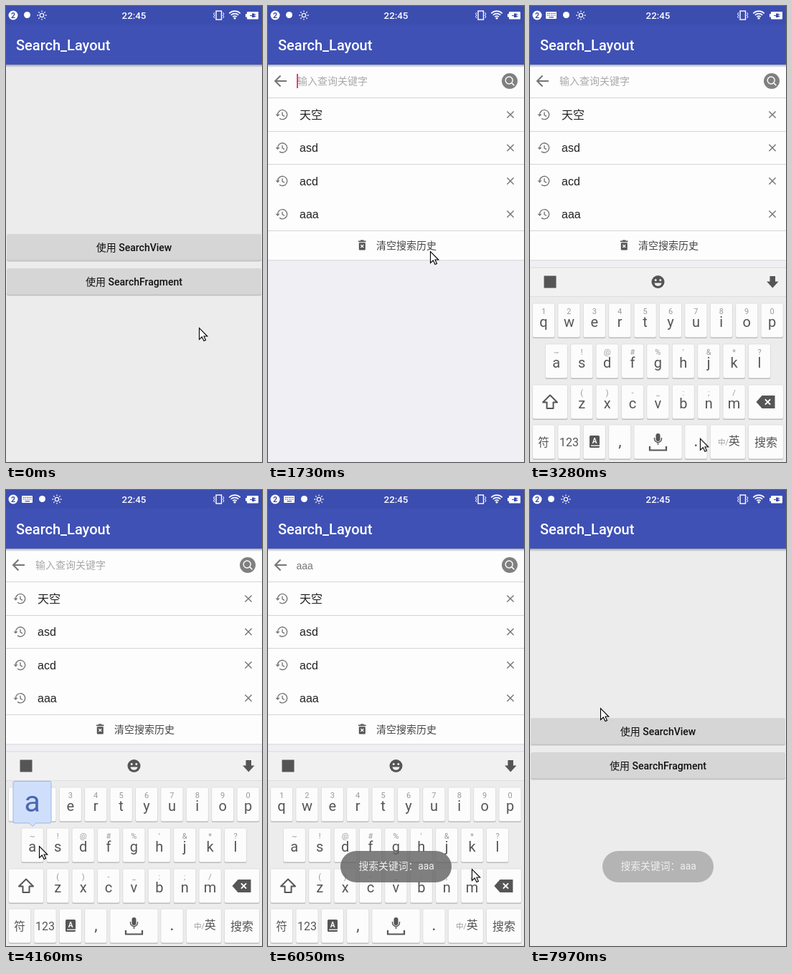
Animation of 357x638 px, one loop 8000 ms. Source, as an HTML page:

```html
<!DOCTYPE html>
<html lang="zh">
<head>
<meta charset="utf-8">
<title>Search_Layout</title>
<style>
html, body { margin: 0; width: 100%; height: 100%; overflow: hidden; background: #ececec; }
svg { display: block; width: 100vw; height: 100vh; }
text { font-family: Roboto, "Noto Sans CJK SC", "Noto Sans CJK", sans-serif; white-space: pre; }
.entry text { font-family: "Liberation Sans", "Noto Sans CJK SC", "Noto Sans CJK", sans-serif; }
.key { fill: #fcfcfc; stroke: #d6d6d6; stroke-width: .6; }
</style>
</head>
<body>
<svg id="stage" viewBox="0 0 357 638" preserveAspectRatio="none"></svg>
<script>
const LOOP = 8000;
const sheet = [];
let trackCount = 0;

// Turns [ms, css, easing] stops into a looping keyframe animation.
function track(stops, timing = 'linear') {
  const name = 'track' + trackCount++;
  const last = stops[stops.length - 1];
  const frames = [...stops, [LOOP, last[1]]]
    .map(([ms, css, ease]) => `${ms / LOOP * 100}%{${css}${ease ? `;animation-timing-function:${ease}` : ''}}`);
  sheet.push(`@keyframes ${name}{${frames.join('')}}.${name}{animation:${name} ${LOOP}ms ${timing} infinite}`);
  return name;
}

// Hard on/off switching; times alternate between on and off.
const visible = (...times) => track(
  [[0, 'opacity:0'], ...times.map((ms, i) => [ms, `opacity:${i % 2 ? 0 : 1}`])], 'step-end');

const move = (x, y) => `transform:translate(${x}px,${y}px)`;
const group = (cls, ...parts) => `<g class="${cls}">${parts.join('')}</g>`;
const at = (x, y, ...parts) => `<g transform="translate(${x} ${y})">${parts.join('')}</g>`;
const rect = (x, y, w, h, fill, extra = '') =>
  `<rect x="${x}" y="${y}" width="${w}" height="${h}" fill="${fill}" ${extra}/>`;
const circle = (x, y, r, fill, extra = '') => `<circle cx="${x}" cy="${y}" r="${r}" fill="${fill}" ${extra}/>`;
const fillPath = (d, fill, extra = '') => `<path d="${d}" fill="${fill}" ${extra}/>`;
const line = (d, color, width = 1.5, extra = '') =>
  `<path d="${d}" fill="none" stroke="${color}" stroke-width="${width}" ${extra}/>`;
const label = (x, y, size, fill, str, anchor = 'start', weight = 400) =>
  `<text x="${x}" y="${y}" font-size="${size}" fill="${fill}" text-anchor="${anchor}" font-weight="${weight}">${str}</text>`;
const centered = (x, y, size, fill, str, weight) => label(x, y, size, fill, str, 'middle', weight);

// Status bar and toolbar
const toolbar = () =>
  rect(0, 82, 357, 4, 'url(#shade)') + rect(0, 0, 357, 82, '#3f51b5') + rect(0, 0, 357, 26, '#3c4db0') +
  label(14, 62, 20, '#fff', 'Search_Layout', 'start', 500);

function sun() {
  let rays = '';
  for (let i = 0; i < 8; i++) {
    const c = Math.cos(i * Math.PI / 4), s = Math.sin(i * Math.PI / 4);
    rays += `M${c * 4.8} ${s * 4.8}L${c * 6.6} ${s * 6.6}`;
  }
  return circle(0, 0, 2.7, 'none', 'stroke="#fff" stroke-width="1.2"') + line(rays, '#fff', 1.3);
}

function statusIcons() {
  const shift = track([[0, move(0, 0)], [1800, move(21, 0)], [7700, move(0, 0)]], 'step-end');
  const wifi = [4, 7.5, 11].map(r => {
    const d = r * .7;
    return line(`M${-d} ${-d}A${r} ${r} 0 0 1 ${d} ${-d}`, '#fff', 1.7);
  }).join('');
  return circle(10, 13, 6.5, '#fff') + centered(10, 16.8, 10.5, '#3c4db0', '2', 700) +
    group(visible(1800, 7700),
      rect(22, 8, 15, 10, '#fff', 'rx="1"'),
      line('M24 10.5H35.5M24 13H35.5', '#3c4db0', 1.2, 'stroke-dasharray="1.5 1"'), line('M26.5 15.7H33', '#3c4db0', 1.2)) +
    group(shift, circle(29.5, 12.5, 4.5, '#fff'), at(50, 13, sun())) +
    centered(178.5, 18, 13.3, '#fff', '22:45', 500) +
    rect(293, 7, 7.5, 12, 'none', 'stroke="#fff" stroke-width="1.4"') +
    line('M291 9l-1.5 2l1.5 2l-1.5 2l1.5 2M302.5 9l1.5 2l-1.5 2l1.5 2l-1.5 2', '#fff', 1) +
    at(319, 18, wifi, circle(0, -1, 1.6, '#fff')) +
    rect(336, 8, 16, 10.5, '#fff', 'rx="1"') + rect(334, 11, 2, 4.5, '#fff') +
    fillPath('M340 13h3v-2.5h3.5v1h2v1h-2v1.5h2v1h-2v1h-3.5v-2h-3z', '#3c4db0');
}

// Home page
const button = y =>
  rect(1, y + 2, 355, 36.5, '#c3c3c3', 'rx="2.5"') + rect(1, y, 355, 36.5, '#d6d6d6', 'rx="2.5"');
const buttonText = (y, name) =>
  centered(178.5, y, 14, '#111', `<tspan font-weight="400">使用</tspan> ${name}`, 500);

function home() {
  const press = track([[0, 'opacity:0'], [890, 'opacity:0'], [960, 'opacity:1'], [1090, 'opacity:1'], [1190, 'opacity:0']]);
  return rect(0, 0, 357, 638, '#ececec') + toolbar() +
    button(319) + group(press, rect(0, 356, 357, 6, 'url(#shade)'), rect(1, 322, 355, 34, '#c6c6c6', 'rx="2"')) +
    buttonText(343, 'SearchView') + button(367) + buttonText(391, 'SearchFragment');
}

// Search page
const divider = y => rect(0, y, 357, 1, '#d4d4d4');
const cross = (x, y, r, color, w) => line(`M${x - r} ${y - r}l${2 * r} ${2 * r}m0 ${-2 * r}l${-2 * r} ${2 * r}`, color, w);
const trash = () => rect(126, 328.5, 10.5, 1.7, '#555') + rect(129, 327.4, 4.5, 1.5, '#555') +
  rect(126.8, 331.2, 9, 10.2, '#555', 'rx="1"') + cross(131.3, 336, 2, '#fff', 1.2);

function historyRow(word, y) {
  return at(0, y,
    line('M13.5 0A6.6 6.6 0 1 1 16 5.2M20 -3.5V.5L23 2.3', '#777', 1.4),
    fillPath('M10.5 -.5h6l-3 3.2z', '#777'),
    group('entry', label(44, 5.8, 16, '#222', word)), cross(338, 0, 4.6, '#757575', 1.4));
}

function historyList(words, clearable) {
  const rows = words.map((word, i) => historyRow(word, 152 + i * 46.4));
  const dividers = words.slice(1, 3).map((_, i) => divider(175 + i * 46));
  const end = clearable ? 355 : 128.5 + words.length * 46.4;
  return rect(0, end, 357, 1.5, '#e0e0e4') + rect(0, 129, 357, end - 129, '#fdfdfd') + rows.join('') + dividers.join('') +
    (clearable ? divider(314) + trash() + label(151, 340, 14, '#444', '清空搜索历史') : '');
}

function searchBar() {
  const caretBlink = visible(1430, 1860, 2330, 2830, 3310, 3810, 4220, 5250);
  const caretStep = track([[0, move(0, 0)], [4220, move(8, 0)], [4460, move(15, 0)], [4740, move(22, 0)]], 'step-end');
  const typed = (str, ...times) => group(visible(...times), group('entry', label(39.5, 110.5, 14, '#777', str)));
  return rect(0, 82, 357, 46.5, '#fdfdfd') + rect(0, 82, 357, 4, 'url(#shade)') + divider(128) +
    line('M26 105H10M17.5 97.5L10 105l7.5 7.5', '#757575', 2) +
    group(visible(1430, 4220), label(41, 110.2, 14, '#a9a9a9', '输入查询关键字')) +
    typed('a', 4220, 4460) + typed('aa', 4460, 4740) + typed('aaa', 4740) +
    group(caretBlink, group(caretStep, rect(40, 95, 2, 20, '#f0387c'))) +
    group(visible(4220, 5800), circle(306, 104.5, 8.7, '#666'), cross(306, 104.5, 3.2, '#fff', 2)) +
    circle(337, 105, 11, '#808080') +
    circle(336.2, 104, 5, 'none', 'stroke="#fff" stroke-width="1.4"') + line('M339.8 107.6l3.6 3.6', '#fff', 1.5);
}

function searchPage() {
  const slide = track([
    [0, 'opacity:0;' + move(0, 0)], [1429, 'opacity:0;' + move(0, 21)],
    [1430, 'opacity:.76;' + move(0, 21)], [1500, 'opacity:1;' + move(0, 8)], [1640, 'opacity:1;' + move(0, 0)],
    [7600, 'opacity:1;' + move(0, 0), 'ease-in'], [7680, 'opacity:1;' + move(0, 10)], [7860, 'opacity:0;' + move(0, 51)]]);
  return group(slide, rect(0, 0, 357, 638, '#efeff4'), toolbar(),
    group(visible(1430, 4220, 5800), historyList(['天空', 'asd', 'acd', 'aaa'], true)),
    group(visible(4220, 4460), historyList(['asd', 'acd', 'aaa'])),
    group(visible(4460, 5800), historyList(['aaa'])),
    searchBar());
}

// Keyboard
const INK = '#555';
const key = (x, y, w, h) => rect(x, y + 1.6, w, h, '#bdbdbd', 'rx="2.5"') +
  `<rect class="key" x="${x}" y="${y}" width="${w}" height="${h}" rx="2.5"/>`;
const hint = (x, y, str) => centered(x, y, 11, '#999', str);
const mic = (x, y) => at(x, y,
  rect(-3, -13, 6, 11, INK, 'rx="3"'), line('M-5 -7v1.5a5 5 0 0 0 10 0V-7M0 0V3', INK, 1.4),
  line('M-11.5 5V10.5H11.5V5', INK, 2.2));
const backspace = (x, y) => fillPath(`M${x - 13} ${y}l8 -9h18v18h-18z`, INK) + cross(x + 3, y, 3.6, '#fff', 2);

function keyboardTop() {
  return rect(0, 366, 357, 272, '#ececec') + rect(0, 366, 357, 40, '#f1f1f1') +
    rect(0, 365.5, 357, 1, '#dadada') + rect(0, 406, 357, 1, '#dedede') +
    rect(19.5, 377.5, 17, 17, INK) +
    circle(178.5, 386, 9, INK) + circle(175.2, 383.6, 1.5, '#f1f1f1') + circle(181.8, 383.6, 1.5, '#f1f1f1') +
    fillPath('M173.5 387.5h10a5 4.2 0 0 1 -10 0z', '#f1f1f1') +
    fillPath('M334.5 378h7.5v7.5h4.5l-8.2 9l-8.2 -9h4.4z', INK);
}

function phonePad() {
  const names = ['分词', 'ABC', 'DEF', 'GHI', 'JKL', 'MNO', 'PQRS', 'TUV', 'WXYZ'];
  const marks = [['，', 35, 434], ['。', 35, 480], ['?', 30, 522], ['!', 30, 562]];
  let out = key(3, 412, 54, 170);
  marks.forEach(([mark, x, y], i) => {
    out += centered(x, y, 19, INK, mark);
    if (i) out += rect(8, 412 + i * 41, 44, .7, '#e2e2e2');
  });
  names.forEach((name, i) => {
    const x = 61 + i % 3 * 80, y = 412 + Math.floor(i / 3) * 58.3;
    out += key(x, y, 76, 54) + hint(x + 38, y + 17, i + 1) + centered(x + 38, y + 35.8, 17, INK, name);
  });
  for (let i = 0; i < 3; i++) out += key(301, 412 + i * 58.3, 53, 54);
  out += backspace(327, 440.5) + centered(327.5, 503.5, 16, INK, '重输') + centered(327.5, 562, 18, INK, '0');
  [[3, 54], [61, 76], [141, 76], [221, 76], [301, 53]].forEach(([x, w]) => out += key(x, 587, w, 49));
  return out + centered(30, 618, 16, INK, '符') + centered(99, 618, 17, INK, '123') + mic(178.5, 613) +
    label(243, 617.5, 16, INK, '中<tspan font-size="11" fill="#999">/英</tspan>') + centered(327.5, 617.5, 16, INK, '搜索');
}

function letterPad() {
  const rows = [[3.5, 416, 'qwertyuiop', '1234567890'], [21.3, 473, 'asdfghjkl', "~!@#%'&amp;*?"], [56.7, 530, 'zxcvbnm', '()-_:;/']];
  let out = '';
  rows.forEach(([x0, y, letters, marks]) => {
    const signs = marks.match(/&amp;|./g);
    [...letters].forEach((letter, i) => {
      const x = x0 + i * 35.4;
      out += key(x, y, 31, 47.5) + hint(x + 15.5, y + 14.5, signs[i]) + centered(x + 15.5, y + 32.8, 20, INK, letter);
    });
  });
  out += key(3.5, 530, 49, 47.5) + line('M28 544.5l10 10h-5.5v8.5h-9v-8.5h-5.5z', INK, 2, 'stroke-linejoin="round"') +
    key(304.5, 530, 49, 47.5) + backspace(328.5, 554);
  [[3.5, 31], [39, 31], [74.3, 31], [109.7, 31], [145, 67], [216, 31], [251.3, 49], [304.5, 49]]
    .forEach(([x, w]) => out += key(x, 586, w, 47.5));
  return out + centered(19, 616, 15.5, INK, '符') + centered(54.5, 615.5, 16, INK, '123') +
    rect(83, 601, 14, 17, INK, 'rx="1.5"') + centered(90, 612, 10, '#fff', 'A', 700) + rect(85, 614.5, 12, 1.3, '#fff') +
    centered(125.3, 616, 22, INK, ',') + mic(178.5, 611) + centered(231.5, 616, 24, INK, '.') +
    label(262, 614, 10.5, '#999', '中/<tspan font-size="16" fill="#555">英</tspan>') + centered(329, 615.5, 16, INK, '搜索');
}

function keyboard() {
  const rise = track([
    [0, move(0, 280)], [1800, move(0, 280), 'cubic-bezier(0,0,.3,1)'], [2150, move(0, 0)],
    [7590, move(0, 0), 'ease-in'], [7800, move(0, 280)]]);
  const tint = (x, y, w, h, ...times) => group(visible(...times), rect(x, y, w, h, '#000', 'opacity=".13" rx="2.5"'));
  const popup = group(visible(4060, 4220, 4320, 4460, 4600, 4740),
    fillPath('M12 407.5H61a2 2 0 0 1 2 2V464a2 2 0 0 1 -2 2H42l-5 4.5l-5 -4.5H12a2 2 0 0 1 -2 -2V409.5a2 2 0 0 1 2 -2z',
      '#cfdffb', 'stroke="#9bb5e8"'),
    centered(36.7, 449.5, 41, '#4b66b2', 'a'));
  return group(rise, keyboardTop(),
    group(visible(1430, 3160), phonePad(), tint(221, 587, 76, 49, 3090, 3160)),
    group(visible(3160), letterPad(), tint(304.5, 586, 49, 47.5, 5690, 5800), popup));
}

function toast() {
  const fade = track([[0, 'opacity:0'], [5860, 'opacity:0'], [6100, 'opacity:1'], [7800, 'opacity:1'], [7970, 'opacity:.39']]);
  return group(fade, rect(101, 505, 155, 44, '#5f5f5f', 'rx="22"'), label(126.5, 531, 13.8, '#f4f4f4', '搜索关键词：aaa'));
}

function pointer() {
  const ease = 'cubic-bezier(.4,0,.4,1)';
  const path = track([
    [0, move(269, 450)], [50, move(269, 450), ease], [530, move(226, 343)],
    [2240, move(226, 343), ease], [2620, move(215, 624), ease], [3040, move(250, 612)],
    [3180, move(250, 612), ease], [3810, move(46, 498)],
    [4180, move(46, 498)], [4300, move(45, 494)],
    [4850, move(45, 494), ease], [5570, move(331, 617)],
    [5800, move(331, 617), 'cubic-bezier(.4,0,.8,.8)'], [6470, move(92, 176), 'ease-out'], [6990, move(15, 105)],
    [7600, move(15, 105), ease], [7960, move(98, 305)]]);
  return group(path, fillPath('M.5 .5V16.5L4.3 13L7 18.5L9.5 17.5L7 12H11.8Z', '#fff', 'stroke="#000" stroke-width="1.1"'));
}

document.getElementById('stage').innerHTML =
  `<defs><linearGradient id="shade" x2="0" y2="1"><stop stop-opacity=".32"/><stop offset="1" stop-opacity="0"/></linearGradient></defs>` +
  home() + searchPage() + keyboard() + toast() + statusIcons() + pointer();
const style = document.createElement('style');
style.textContent = sheet.join('\n');
document.head.append(style);
</script>
</body>
</html>
```
